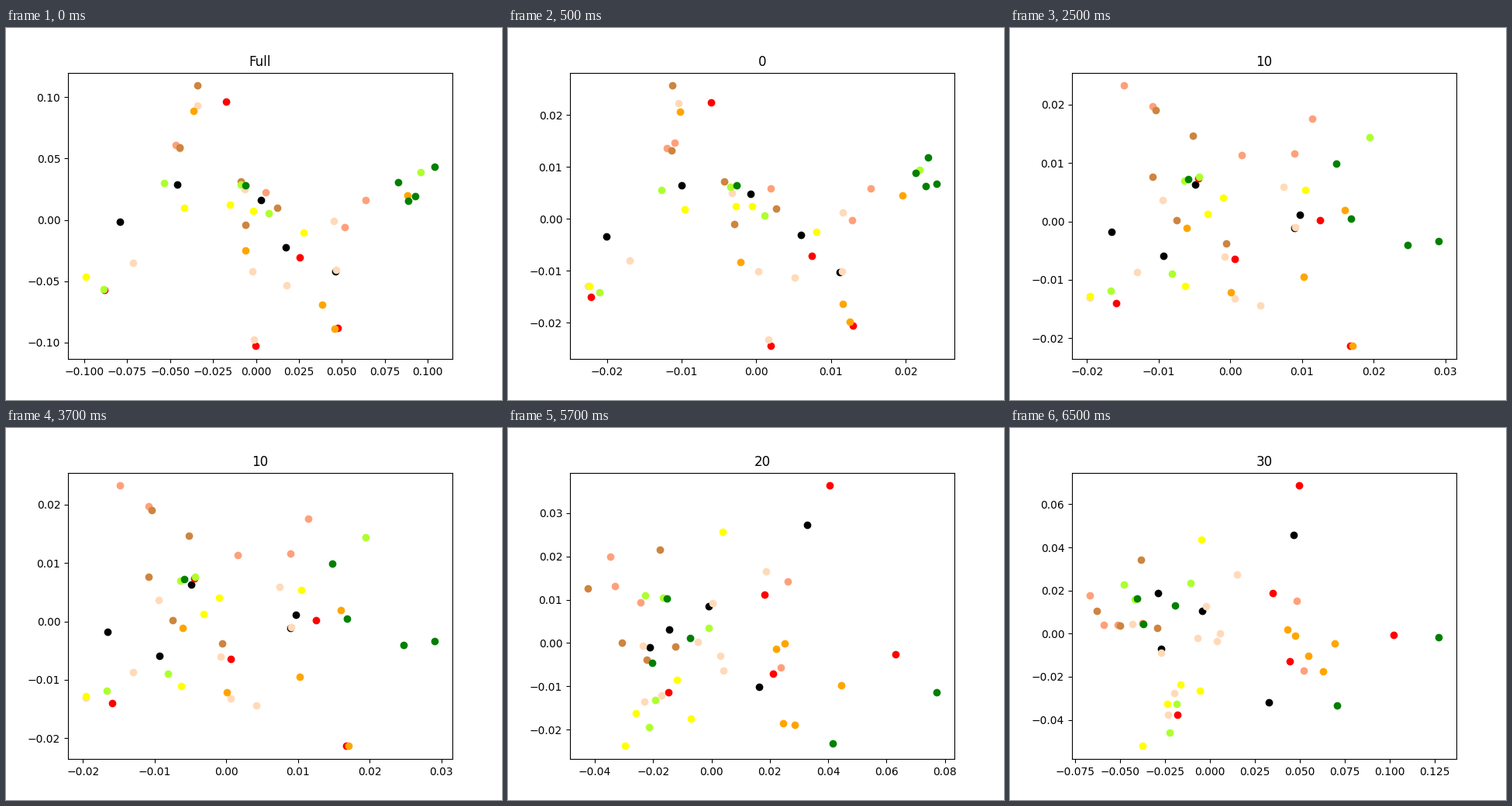
These frames come from a looping animation (640x480 px, 8 s). A matplotlib script:

```python
import matplotlib.pyplot as plt
from matplotlib.animation import FuncAnimation

WIDTH, HEIGHT, DPI = 640, 480, 100
LEFT, RIGHT, TOP, BOTTOM = 80, 576, 57.6, 427.2  # axes edges on the stage

scenes = []


def add_scene(title, x_axis, y_axis, **groups):
    """Axes are (stage position of zero, pixels per unit); groups hold stage points."""
    scenes.append((title, x_axis, y_axis, groups))


add_scene(
    "Full", (322.5, 2215), (247.5, 1582),
    black=[(147, 250), (221, 202), (329, 222), (361, 283), (425, 314)],
    red=[(284, 95), (379, 296), (127, 338), (428, 387), (322, 410)],
    lightsalmon=[(219, 151), (224, 155), (335, 212), (464, 222), (437, 257)],
    peachpuff=[(247, 100), (308, 208), (423, 249), (164, 303), (318, 314),
               (362, 332), (426, 312), (320, 402)],
    peru=[(247, 74), (224, 154), (303, 198), (350, 232), (309, 254)],
    orange=[(242, 107), (518, 216), (309, 287), (408, 357), (424, 388)],
    yellow=[(230, 232), (289, 228), (319, 236), (384, 264), (103, 321)],
    greenyellow=[(204, 200), (303, 202), (339, 239), (535, 186), (126, 337)],
    green=[(309, 203), (506, 199), (553, 179), (519, 223), (528, 217)],
)
add_scene(
    "0", (320.4, 9637), (246.4, 6700),
    black=[(127, 269), (224, 203), (313, 214), (378, 267), (428, 315)],
    red=[(262, 96), (392, 294), (107, 347), (445, 384), (339, 410)],
    lightsalmon=[(205, 155), (215, 148), (339, 207), (468, 207), (444, 248)],
    peachpuff=[(220, 97), (289, 213), (432, 238), (157, 300), (323, 314),
               (370, 322), (431, 314), (336, 402), (103, 333)],
    peru=[(212, 74), (211, 158), (279, 198), (346, 233), (292, 253)],
    orange=[(222, 108), (509, 216), (300, 302), (432, 356), (441, 379)],
    yellow=[(228, 234), (294, 230), (315, 230), (398, 263), (105, 333)],
    greenyellow=[(198, 209), (287, 205), (331, 242), (531, 183), (118, 341)],
    green=[(295, 203), (526, 187), (542, 167), (539, 204), (553, 201)],
)
add_scene(
    "10", (284.4, 9250), (249.5, 7545),
    black=[(131, 263), (239, 202), (374, 241), (367, 258), (198, 294)],
    red=[(243, 194), (400, 248), (290, 298), (137, 355), (439, 410)],
    lightsalmon=[(147, 74), (184, 101), (299, 164), (390, 117), (367, 162)],
    peachpuff=[(197, 222), (353, 205), (164, 315), (277, 295), (290, 349),
               (323, 358), (368, 257), (103, 348)],
    peru=[(188, 106), (236, 139), (184, 192), (215, 248), (279, 278)],
    orange=[(228, 258), (432, 235), (285, 341), (379, 321), (442, 410)],
    yellow=[(275, 219), (255, 240), (381, 209), (226, 333), (103, 346)],
    greenyellow=[(464, 141), (225, 197), (244, 192), (209, 317), (130, 339)],
    green=[(230, 195), (421, 175), (440, 246), (513, 280), (553, 275)],
)
add_scene(
    "20", (262.6, 3762), (277.4, 5582),
    black=[(386, 125), (259, 230), (208, 260), (183, 283), (324, 334)],
    red=[(415, 74), (331, 215), (342, 317), (500, 292), (207, 341)],
    lightsalmon=[(132, 166), (138, 204), (171, 225), (361, 198), (352, 309)],
    peachpuff=[(333, 185), (264, 226), (174, 281), (245, 276), (274, 294),
               (278, 313), (198, 345), (176, 353)],
    peru=[(196, 157), (103, 207), (147, 277), (216, 282), (179, 299)],
    orange=[(346, 285), (357, 278), (430, 332), (355, 381), (370, 383)],
    yellow=[(277, 134), (218, 325), (165, 368), (236, 375), (151, 410)],
    greenyellow=[(177, 216), (200, 219), (259, 258), (190, 351), (182, 386)],
    green=[(205, 220), (235, 271), (186, 303), (419, 407), (553, 341)],
)
add_scene(
    "30", (258.3, 2318), (265.3, 2782),
    black=[(366, 138), (191, 213), (248, 236), (195, 285), (334, 354)],
    red=[(373, 74), (339, 213), (495, 267), (361, 301), (216, 370)],
    lightsalmon=[(103, 216), (121, 254), (139, 254), (370, 223), (379, 313)],
    peachpuff=[(293, 189), (253, 230), (158, 253), (242, 271), (271, 265),
               (267, 275), (195, 290), (212, 342), (204, 370)],
    peru=[(169, 170), (112, 236), (142, 255), (171, 252), (190, 258)],
    orange=[(358, 260), (368, 268), (385, 294), (419, 278), (404, 314)],
    yellow=[(247, 144), (220, 331), (203, 356), (245, 339), (171, 410)],
    greenyellow=[(147, 202), (161, 221), (233, 200), (215, 356), (206, 393)],
    green=[(164, 220), (213, 229), (172, 253), (422, 358), (553, 270)],
)

fig, ax = plt.subplots(figsize=(WIDTH / DPI, HEIGHT / DPI), dpi=DPI)
fig.subplots_adjust(left=LEFT / WIDTH, right=RIGHT / WIDTH,
                    bottom=1 - BOTTOM / HEIGHT, top=1 - TOP / HEIGHT)


def draw(step):
    # The first scene holds for one step, each later one for four.
    title, (zero_x, unit_x), (zero_y, unit_y), groups = scenes[(step + 3) // 4]
    ax.clear()
    for color, points in groups.items():
        xs = [(x - zero_x) / unit_x for x, _ in points]
        ys = [(zero_y - y) / unit_y for _, y in points]
        ax.scatter(xs, ys, color=color)
    ax.set_xlim((LEFT - zero_x) / unit_x, (RIGHT - zero_x) / unit_x)
    ax.set_ylim((zero_y - BOTTOM) / unit_y, (zero_y - TOP) / unit_y)
    ax.set_title(title)
    return []


anim = FuncAnimation(fig, draw, frames=16, interval=500,
                     init_func=lambda: draw(0), repeat=True, repeat_delay=0)
plt.show()
```
